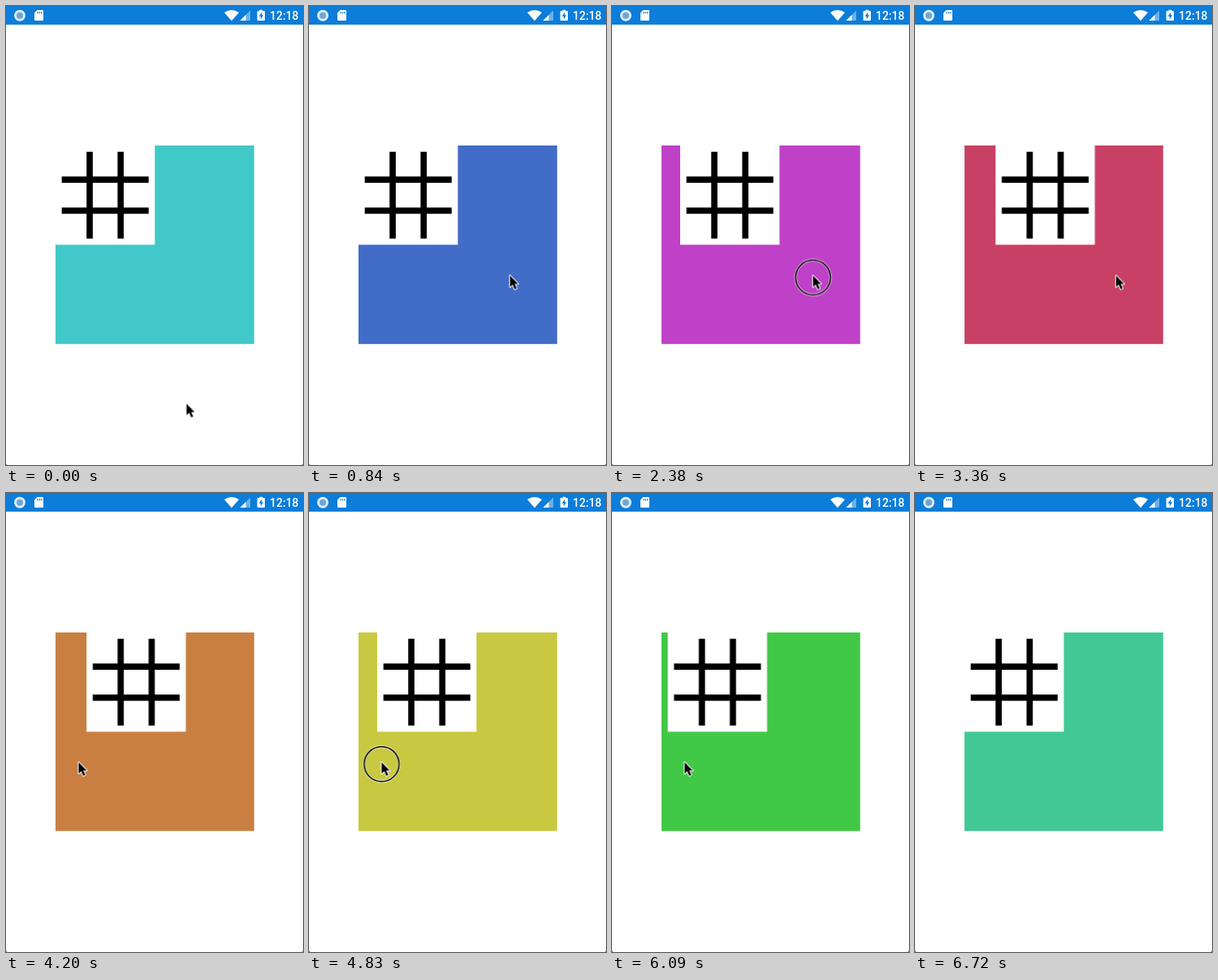
An HTML page that plays this animation: 366x566 px, repeating every 6.86 s.

```html
<!DOCTYPE html>
<html lang="en">
<head>
<meta charset="utf-8">
<title>Tile nudge</title>
<style>
  @property --hue { syntax: "<number>"; inherits: false; initial-value: 180; }

  html, body { margin: 0; width: 100%; height: 100%; overflow: hidden; background: #444; }
  svg { display: block; width: 366px; height: 566px; background: #fff; border-radius: 0 0 2px 2px; }
  .time { font: 500 14px Roboto, sans-serif; fill: #fff; }

  .board, .tile, .cursor, .ring { animation: 6860ms infinite; }
  .board { animation-name: hue; fill: hsl(var(--hue) 55% 52%); }
  .tile { animation-name: nudge; animation-timing-function: step-end; }
  .ring { animation-name: press; animation-timing-function: step-end; opacity: 0; }
  .cursor { animation-name: travel; animation-timing-function: ease-in-out; }

  /* the colour advances once every 70 ms */
  @keyframes hue {
    0% { --hue: 180; animation-timing-function: steps(12); }
    12.244% { --hue: 221; animation-timing-function: steps(22); }
    34.693% { --hue: 296; animation-timing-function: steps(14); }
    48.979% { --hue: 344.5; animation-timing-function: steps(21); }
    70.407% { --hue: 420; animation-timing-function: steps(10); }
    80.611% { --hue: 451; animation-timing-function: steps(17); }
    97.958%, 100% { --hue: 517; }
  }

  @keyframes nudge {
    0%, 90.22%, 100% { transform: translateX(0); }
    20.4%, 84.83% { transform: translateX(7.65px); }
    27.54%, 78.56% { transform: translateX(15.3px); }
    34.1%, 69.97% { transform: translateX(22.95px); }
    41.83%, 63.26% { transform: translateX(30.6px); }
    45.91% { transform: translateX(38.25px); }
  }

  @keyframes press {
    0%, 22.95%, 30.1%, 37.24%, 43.87%, 47.95%,
    65.3%, 72.44%, 81.63%, 86.87%, 91.8%, 100% { opacity: 0; }
    19.38%, 26.52%, 33.66%, 40.8%, 44.89%,
    62.24%, 69.38%, 77.54%, 83.81%, 89.35% { opacity: 1; }
  }

  @keyframes travel {
    0%, 1.5% { transform: translate(222.5px, 490.5px); }
    10.2%, 53.06% { transform: translate(247.7px, 332.5px); }
    59.18%, 91.84% { transform: translate(89.5px, 332px); visibility: visible; }
    96.9% { transform: translate(130px, 470px); visibility: visible; animation-timing-function: step-end; }
    96.95%, 100% { transform: translate(130px, 470px); visibility: hidden; }
  }
</style>
</head>
<body>
<svg viewBox="0 0 366 566">
  <rect width="366" height="23" fill="#0c7dd9"/>
  <g fill="#fff">
    <circle cx="17" cy="11.8" r="7" fill="#dcebf8"/>
    <circle cx="17" cy="11.8" r="4" fill="#6fa5d6"/>
    <path d="M38.5 5H45Q46 5 46 6V17Q46 18 45 18H36Q35 18 35 17V8.5Z"/>
    <path d="M39 7v2.6M41.3 7v2.6M43.6 7v2.6" stroke="#0c7dd9" stroke-width="1.1"/>
    <path d="M278 18.3L269 7.9Q278 2.2 287 7.9Z"/>
    <path d="M301 5.5V18H288.5Z" opacity=".4"/>
    <path d="M295.5 11V18H288.5Z"/>
    <path d="M312.6 4.8h3.4V6.1h2q1 0 1 1V17q0 1-1 1h-7.4q-1 0-1-1V7.1q0-1 1-1h2Z"/>
    <path d="M315.2 7.6L311.7 12.7H313.8V16.6L317.2 11.3H315.2Z" fill="#0c7dd9"/>
  </g>
  <text class="time" x="325" y="17">12:18</text>

  <rect class="board" x="61" y="172" width="244.8" height="244.8"/>
  <g class="tile">
    <rect x="61" y="171.6" width="122.4" height="122.8" fill="#fff"/>
    <path d="M103.1 179.7v107.1M141.3 179.7v107.1M68.7 214.1h107.1M68.7 252.3h107.1" stroke="#000" stroke-width="7.65"/>
  </g>

  <g class="cursor">
    <g class="ring" fill="none">
      <circle cy="2.3" r="21.5" stroke="#fff" stroke-opacity=".65" stroke-width="3.4"/>
      <circle cy="2.3" r="21.5" stroke="#000" stroke-width="1.6"/>
    </g>
    <path d="M0 0V14L3.2 11.1L5.8 16.8L8.2 15.7L5.7 10.2H10Z" fill="#000" stroke="#fff" stroke-width="2" stroke-linejoin="round" paint-order="stroke"/>
  </g>
</svg>
</body>
</html>
```
